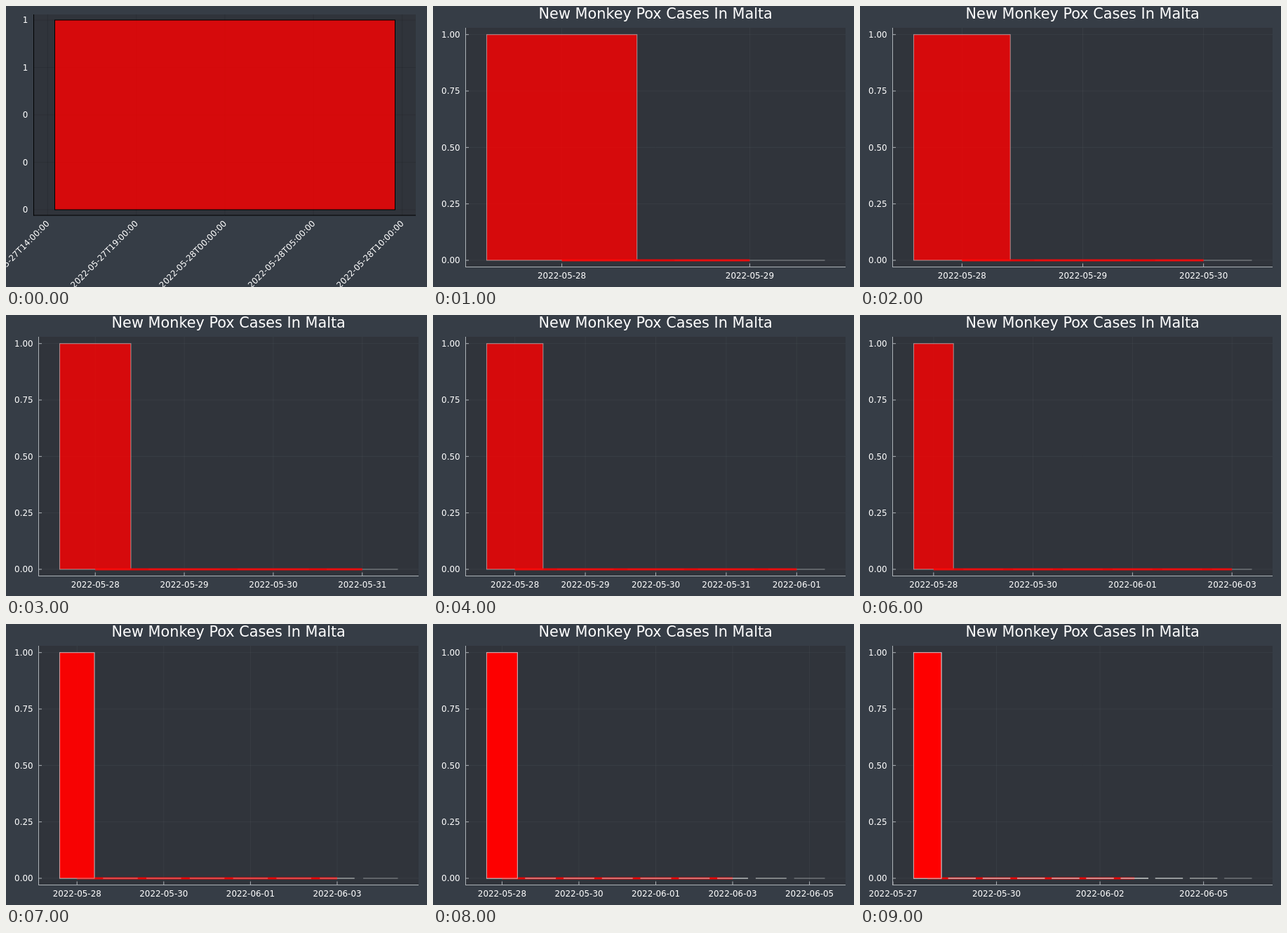
These frames come from a looping animation (600x400 px, 10000 ms). An HTML page with a canvas:

```html
<!DOCTYPE html>
<html lang="en">
<head>
<meta charset="utf-8">
<title>New cases by day</title>
<style>
  html, body { margin: 0; width: 100%; height: 100%; overflow: hidden; background: #363d46; }
  canvas { display: block; width: 600px; height: 400px; }
</style>
</head>
<body>
<canvas id="stage" width="600" height="400"></canvas>
<script>
const ctx = document.getElementById('stage').getContext('2d');
const STEP = 1000, STEPS = 10, AVERAGED = 7;
const FONT = '"DejaVu Sans", sans-serif';
const FG = '#adb2b7', RED = 'rgba(255,0,0,0.8)', OUTLINE = 'rgba(200,203,206,0.6)';
const LEFT = 76.5, RIGHT = 558.5, ZERO = 362, ONE = 40.7;

function line(x1, y1, x2, y2, color, width = 1) {
  ctx.strokeStyle = color;
  ctx.lineWidth = width;
  ctx.beginPath();
  ctx.moveTo(x1, y1);
  ctx.lineTo(x2, y2);
  ctx.stroke();
}

function text(str, x, y, align, size = 11.9) {
  ctx.font = `${size}px ${FONT}`;
  ctx.textAlign = align;
  ctx.fillStyle = '#fff';
  ctx.fillText(str, x, y);
}

function panel(x1, y1, x2, y2) {
  ctx.fillStyle = '#363d46';
  ctx.fillRect(0, 0, 600, 400);
  ctx.fillStyle = '#30343b';
  ctx.fillRect(x1, y1, x2 - x1, y2 - y1);
}

// Day 0 is 2022-05-28.
const dateOf = day => new Date(Date.UTC(2022, 4, 28 + day)).toISOString().slice(0, 10);

function drawFirstDay() {
  const grid = 'rgba(0,0,0,0.1)', black = '#000';
  panel(39.5, 12, 584, 298);
  const xs = [0, 1, 2, 3, 4].map(i => 59.4 + i * 126.3);
  const ys = [0, 1, 2, 3, 4].map(i => 290 - i * 67.5);
  xs.forEach(x => line(x, 12, x, 298, grid));
  ys.forEach(y => line(39.5, y, 584, y, grid));

  ctx.fillStyle = RED;
  ctx.fillRect(69.5, 20, 485, 270);
  ctx.strokeStyle = black;
  ctx.lineWidth = 1;
  ctx.strokeRect(69.5, 20, 485, 270);

  line(39.5, 12, 39.5, 298.5, black);
  line(39, 298, 584, 298, black);
  ys.forEach((y, i) => text(i > 2 ? '1' : '0', 31.3, y + 4.4, 'right'));
  xs.forEach((x, i) => {
    const stamp = new Date(Date.UTC(2022, 4, 27, 14 + 5 * i)).toISOString().slice(0, 19);
    ctx.save();
    ctx.translate(x, 307.3);
    ctx.rotate(-Math.PI / 4);
    text(stamp, 0, 4.4, 'right');
    ctx.restore();
  });
}

function drawBars(count, toX, half) {
  const x = toX(0) - half;
  ctx.fillStyle = RED;
  ctx.fillRect(x, ONE, 2 * half, ZERO - ONE);
  ctx.strokeStyle = OUTLINE;
  ctx.lineWidth = 1.1;
  ctx.strokeRect(x, ONE, 2 * half, ZERO - ONE);
  for (let d = 1; d < count; d++) {
    line(toX(d) - half, ZERO, toX(d) + half, ZERO, OUTLINE, 1.1);
  }
}

function drawDays(n) {
  const unit = (RIGHT - LEFT) / (n - 0.2);
  const toX = day => LEFT + (day + 0.4) * unit;
  const gap = n < 6 ? 1 : n < 10 ? 2 : 3;
  const grid = 'rgba(173,178,183,0.07)';
  panel(46.5, 31, 588, 371.5);

  const days = [];
  for (let d = n === 10 ? -1 : 0; d < n; d += gap) days.push(d);
  const levels = [0, 0.25, 0.5, 0.75, 1];
  const toY = v => ZERO - v * (ZERO - ONE);

  days.forEach(d => line(toX(d), 31, toX(d), 371.5, grid));
  levels.forEach(v => line(46.5, toY(v), 588, toY(v), grid));

  line(46.5, 31, 46.5, 372, FG);
  line(46, 371.5, 588, 371.5, FG);
  days.forEach(d => {
    line(toX(d), 371.5, toX(d), 366.5, FG);
    text(dateOf(d), toX(d), 387.6, 'center');
  });
  levels.forEach(v => {
    line(46.5, toY(v), 51, toY(v), FG);
    text(v.toFixed(2), 38.6, toY(v) + 4.4, 'right');
  });
  text('New Monkey Pox Cases In Malta', 317.2, 18.3, 'center', 20.8);

  // Bars pile up once the averaged line has reached its full length.
  const first = Math.min(n, AVERAGED);
  drawBars(first, toX, 0.4 * unit);
  line(toX(0), ZERO, toX(first - 1), ZERO, 'rgba(255,0,0,0.85)', 3);
  for (let k = first + 1; k <= n; k++) drawBars(k, toX, 0.4 * unit);
}

let shown = 0;
const start = performance.now();
function tick() {
  const elapsed = Math.max(0, performance.now() - start);
  const n = Math.floor(elapsed / STEP) % STEPS + 1;
  if (n !== shown) {
    shown = n;
    if (n === 1) drawFirstDay();
    else drawDays(n);
  }
  requestAnimationFrame(tick);
}
tick();
</script>
</body>
</html>
```
